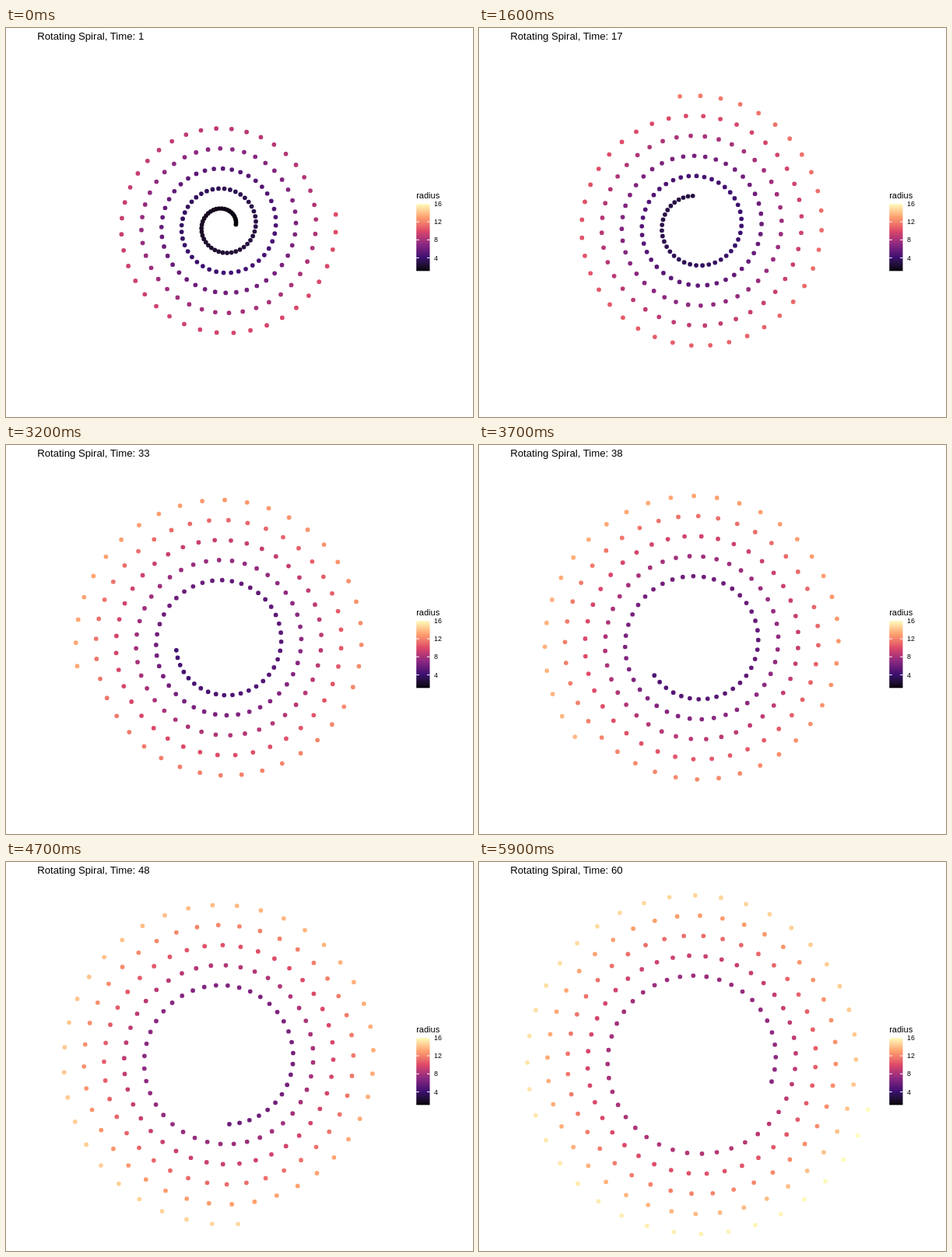
Animation, 600 px wide and 500 px high, one loop 6000 ms. Source, as an HTML page:

```html
<!DOCTYPE html>
<html lang="en">
<head>
<meta charset="utf-8">
<title>Rotating Spiral</title>
<style>
  html, body { margin: 0; width: 100%; height: 100%; overflow: hidden; background: #fff; }
  svg { display: block; font-family: "Liberation Sans", Arial, sans-serif; }
</style>
</head>
<body>
<svg id="stage" width="600" height="500" viewBox="0 0 600 500">
  <defs><linearGradient id="ramp" x1="0" y1="1" x2="0" y2="0"></linearGradient></defs>
  <text id="title" x="40.2" y="15.4" font-size="13.2"></text>
  <g id="dots"></g>
  <g id="legend">
    <text x="527.2" y="218.8" font-size="11">radius</text>
    <rect x="527.2" y="225.9" width="17.28" height="86.4" fill="url(#ramp)"/>
  </g>
</svg>
<script>
const COUNT = 200, TURNS = 5, STEPS = 60, STEP_MS = 100;
const CX = 279.7, CY = 254.1, UNIT = 14.33;
const R_MIN = 1.1, R_MAX = 16;
const BAR = { x: 527.2, y: 225.9, w: 17.28, h: 86.4 };
const MAGMA = ["#000004", "#3B0F70", "#8C2981", "#DE4968", "#FE9F6D", "#FCFDBF"];
const WHITE = [0.95047, 1, 1.08883];

const $ = id => document.getElementById(id);

function add(parent, tag, attrs) {
  const el = document.createElementNS("http://www.w3.org/2000/svg", tag);
  for (const k in attrs) el.setAttribute(k, attrs[k]);
  return parent.appendChild(el);
}

function toLab(hex) {
  const [r, g, b] = [1, 3, 5].map(i => {
    const c = parseInt(hex.slice(i, i + 2), 16) / 255;
    return c <= 0.04045 ? c / 12.92 : ((c + 0.055) / 1.055) ** 2.4;
  });
  const [x, y, z] = [
    0.4124 * r + 0.3576 * g + 0.1805 * b,
    0.2126 * r + 0.7152 * g + 0.0722 * b,
    0.0193 * r + 0.1192 * g + 0.9505 * b
  ].map((v, i) => {
    v /= WHITE[i];
    return v > 0.008856 ? Math.cbrt(v) : 7.787 * v + 16 / 116;
  });
  return [116 * y - 16, 500 * (x - y), 200 * (y - z)];
}

function toRgb([L, a, b]) {
  const fy = (L + 16) / 116;
  const [x, y, z] = [fy + a / 500, fy, fy - b / 200].map((f, i) =>
    WHITE[i] * (f ** 3 > 0.008856 ? f ** 3 : (f - 16 / 116) / 7.787));
  const rgb = [
    3.2406 * x - 1.5372 * y - 0.4986 * z,
    -0.9689 * x + 1.8758 * y + 0.0415 * z,
    0.0557 * x - 0.204 * y + 1.057 * z
  ].map(c => {
    c = Math.min(1, Math.max(0, c));
    return Math.round(255 * (c <= 0.0031308 ? 12.92 * c : 1.055 * c ** (1 / 2.4) - 0.055));
  });
  return `rgb(${rgb})`;
}

const stops = MAGMA.map(toLab);

// Colour at u in 0..1, blended in Lab
function magma(u) {
  const p = Math.min(1, Math.max(0, u)) * (stops.length - 1);
  const i = Math.min(stops.length - 2, Math.floor(p));
  return toRgb(stops[i].map((c, k) => c + (stops[i + 1][k] - c) * (p - i)));
}

for (let i = 0; i <= 40; i++) add($("ramp"), "stop", { offset: i / 40, "stop-color": magma(i / 40) });

for (const v of [4, 8, 12, 16]) {
  const y = BAR.y + (R_MAX - v) / (R_MAX - R_MIN) * BAR.h;
  const tick = BAR.w / 5;
  for (const x of [BAR.x, BAR.x + BAR.w - tick])
    add($("legend"), "line", { x1: x, x2: x + tick, y1: y, y2: y, stroke: "#fff", "stroke-width": 1.07 });
  add($("legend"), "text", { x: 550, y: y + 3.2, "font-size": 8.8 }).textContent = v;
}

const dots = Array.from({ length: COUNT }, () => add($("dots"), "circle", { r: 2.85 }));

function draw(t) {
  $("title").textContent = `Rotating Spiral, Time: ${t}`;
  dots.forEach((dot, i) => {
    const u = i / (COUNT - 1);
    const angle = u * TURNS * 2 * Math.PI + t / 10;
    const radius = 1 + 9 * u + t / 10;
    dot.setAttribute("cx", (CX + UNIT * radius * Math.cos(angle)).toFixed(2));
    dot.setAttribute("cy", (CY - UNIT * radius * Math.sin(angle)).toFixed(2));
    dot.setAttribute("fill", magma((radius - R_MIN) / (R_MAX - R_MIN)));
  });
}

let shown = 0;
const start = performance.now();
function tick() {
  const t = Math.floor((performance.now() - start) / STEP_MS) % STEPS + 1;
  if (t !== shown) draw(shown = t);
  requestAnimationFrame(tick);
}
tick();
</script>
</body>
</html>
```
